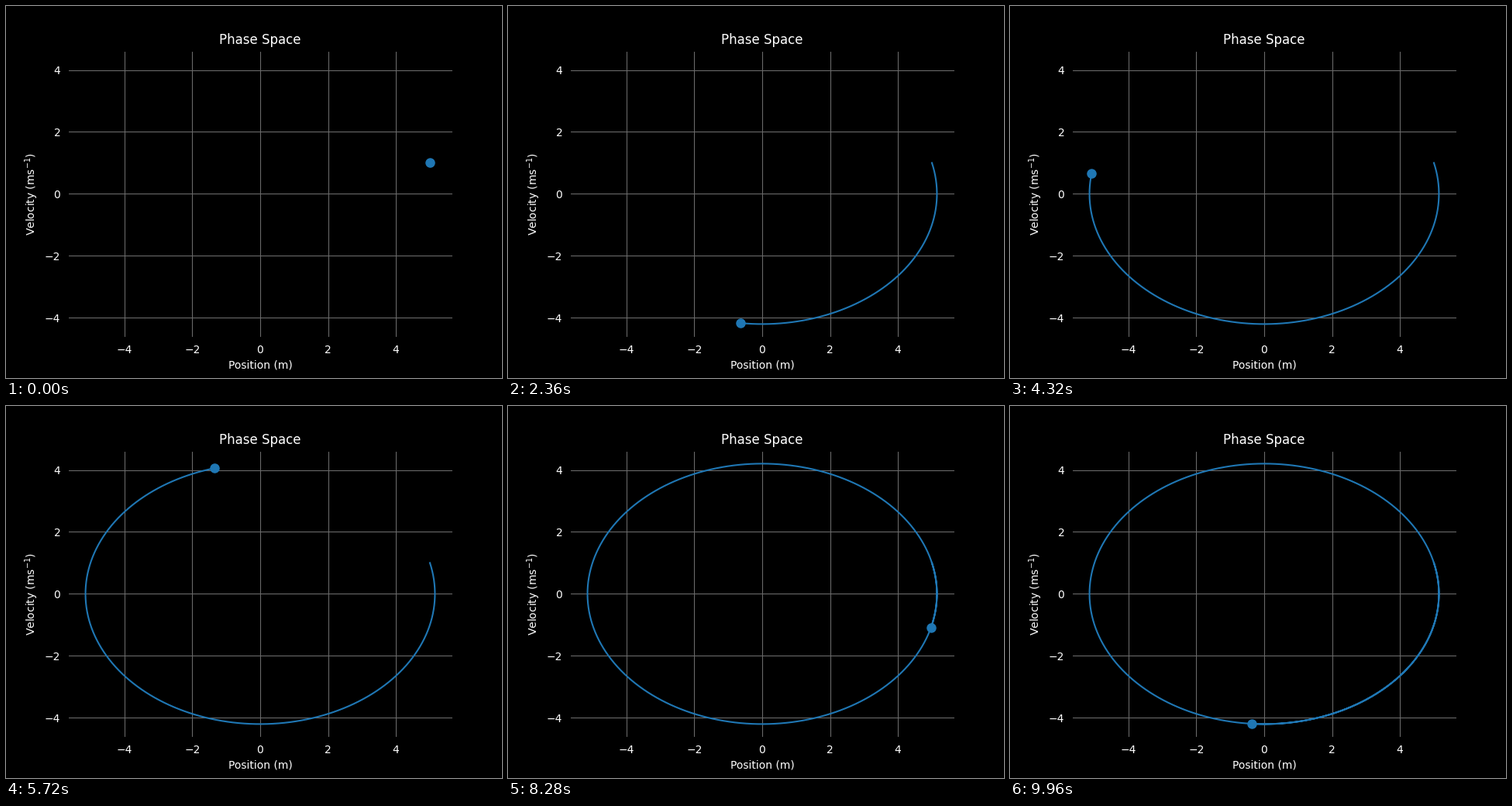
Animation, 640 px wide and 480 px high, one loop 10 s. Source, as a matplotlib script:

```python
import numpy as np
import matplotlib.pyplot as plt
from matplotlib.animation import FuncAnimation

FRAMES = 250
X0, V0 = 5.0, 1.0
OMEGA = np.sqrt(2 / 3)
BLUE = "#1f77b4"

# Undamped harmonic oscillator over ten seconds
t = np.linspace(0, 10, FRAMES)
pos = X0 * np.cos(OMEGA * t) + V0 / OMEGA * np.sin(OMEGA * t)
vel = V0 * np.cos(OMEGA * t) - X0 * OMEGA * np.sin(OMEGA * t)
x_max = 1.1 * np.hypot(X0, V0 / OMEGA)
v_max = 1.1 * np.hypot(X0 * OMEGA, V0)

plt.rcParams["font.family"] = "DejaVu Sans"
fig, ax = plt.subplots(figsize=(6.4, 4.8), dpi=100, facecolor="black")
ax.set_facecolor("black")
ax.set_xlim(-x_max, x_max)
ax.set_ylim(-v_max, v_max)
ax.set_xticks(range(-4, 5, 2))
ax.set_yticks(range(-4, 5, 2))
ax.set_title("Phase Space", color="white")
ax.set_xlabel("Position (m)", color="white")
ax.set_ylabel("Velocity (ms$^{-1}$)", color="white")
ax.tick_params(color="black", labelcolor="white")
ax.spines[:].set_color("black")
ax.grid(color="dimgray")

trail, = ax.plot([], [], color=BLUE, lw=1.5)
dot, = ax.plot([], [], "o", color=BLUE, ms=8)


def update(i):
    trail.set_data(pos[:i + 1], vel[:i + 1])
    dot.set_data([pos[i]], [vel[i]])
    return trail, dot


anim = FuncAnimation(fig, update, frames=FRAMES, interval=40,
                     repeat=True, repeat_delay=0)
plt.show()
```
